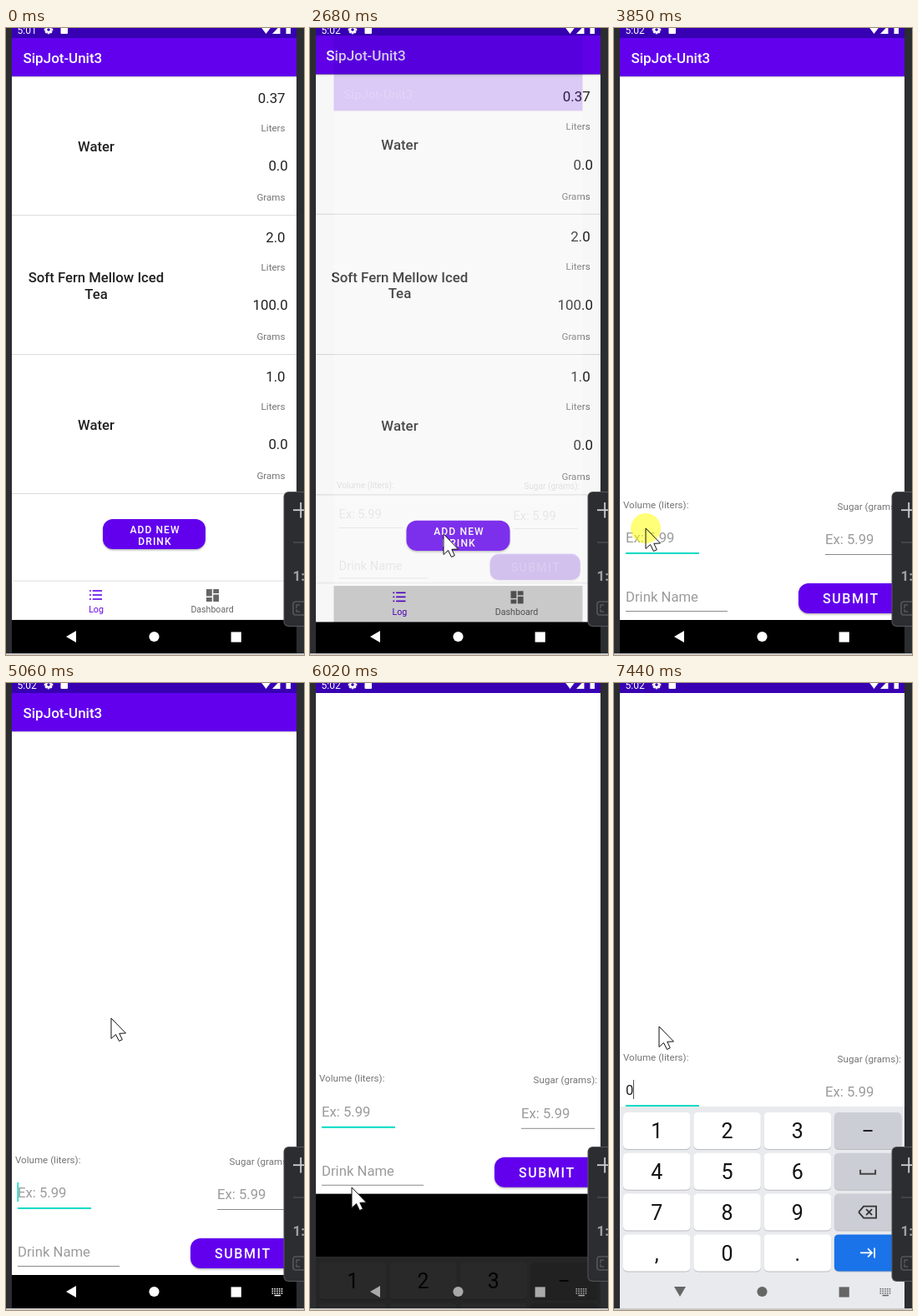
These frames come from a looping animation (357x752 px, 7990 ms). An HTML page with a canvas:

```html
<!DOCTYPE html>
<html lang="en">
<head>
<meta charset="utf-8">
<title>Drink log</title>
<style>
  html, body { margin: 0; width: 100%; height: 100%; overflow: hidden; background: #2b2d30; }
  canvas { display: block; width: 357px; height: 752px; }
</style>
</head>
<body>
<canvas id="stage" width="357" height="752"></canvas>
<script>
const ctx = document.getElementById('stage').getContext('2d');
const LOOP = 7990, STEP = 70;
const LEFT = 7, RIGHT = 348, WIDTH = RIGHT - LEFT;
const PURPLE = '#6200ee', DARK_PURPLE = '#3700b3', TEAL = '#03dac5';
const GREY = '#757575', HINT = '#9b9b9b', INK = '#212121';

const clamp = (v) => Math.min(1, Math.max(0, v));
const span = (t, from, to) => clamp((t - from) / (to - from));
const mix = (a, b, p) => a + (b - a) * p;
const smooth = (p) => p * p * (3 - 2 * p);

const BURSTS = [0, 510, 1680, 2680, 3380, 3850, 4050, 4520, 4850, 5390, 6860, 7310, 7440];
function snap(t) {
  const start = BURSTS.filter((b) => b <= t).pop();
  return start + Math.floor((t - start) / STEP) * STEP;
}

// [from, to, x0, y0, x1, y1]
const MOVES = [
  [440, 1070, 310, 760, 160, 607],
  [3310, 3520, 160, 607, 38, 600],
  [4780, 5060, 38, 600, 126, 402],
  [5320, 5670, 126, 402, 50, 605],
  [6230, 6850, 50, 605, 54, 412],
];
const CLICKS = [1680, 3850, 5670];
const CARET_ON = [[4050, 4590], [5060, 5560], [6810, 7310], [7440, LOOP]];

function rect(x, y, w, h, color) {
  ctx.fillStyle = color;
  ctx.fillRect(x, y, w, h);
}

function round(x, y, w, h, r, color) {
  ctx.fillStyle = color;
  ctx.beginPath();
  ctx.roundRect(x, y, w, h, r);
  ctx.fill();
}

function shadowed(dy, blur, color, draw) {
  ctx.save();
  ctx.shadowOffsetY = dy;
  ctx.shadowBlur = blur;
  ctx.shadowColor = color;
  draw();
  ctx.restore();
}

function poly(points, color) {
  ctx.fillStyle = color;
  ctx.beginPath();
  points.forEach(([x, y]) => ctx.lineTo(x, y));
  ctx.closePath();
  ctx.fill();
}

function lines(color, width, ...paths) {
  ctx.strokeStyle = color;
  ctx.lineWidth = width;
  ctx.beginPath();
  for (const path of paths) path.forEach(([x, y], i) => (i ? ctx.lineTo(x, y) : ctx.moveTo(x, y)));
  ctx.stroke();
}

function disc(x, y, r, color) {
  ctx.fillStyle = color;
  ctx.beginPath();
  ctx.arc(x, y, r, 0, Math.PI * 2);
  ctx.fill();
}

// y is the middle of the capital letters
function text(str, x, y, size, color, { align = 'left', weight = 400, gap = 0 } = {}) {
  ctx.font = `${weight} ${size}px Roboto, sans-serif`;
  ctx.letterSpacing = `${gap}px`;
  ctx.textAlign = align;
  ctx.fillStyle = color;
  ctx.fillText(str, x, y + size * 0.355);
}

function raisedButton(x, y, w, h, captions, size, gap) {
  shadowed(1.5, 2, 'rgba(0,0,0,.28)', () => round(x, y, w, h, 12, PURPLE));
  captions.forEach(([label, cx, cy]) =>
    text(label, cx, cy, size, '#fff', { align: 'center', weight: 500, gap }));
}

function appFrame() {
  rect(LEFT, -60, WIDTH, 72, DARK_PURPLE);
  rect(LEFT, 58, WIDTH, 652, '#fff');
  rect(LEFT, 12, WIDTH, 46, PURPLE);
  rect(LEFT, 58, WIDTH, 1, 'rgba(0,0,0,.16)');
  rect(LEFT, 59, WIDTH, 1, 'rgba(0,0,0,.06)');
  text('SipJot-Unit3', 20.5, 36, 17, '#fff', { weight: 500 });
  rect(LEFT, 710, WIDTH, 240, '#000');
}

function logRow(top, name, liters, grams) {
  name.forEach((line, i) => {
    const y = top + 84 + (i - (name.length - 1) / 2) * 19.5;
    text(line, 108, y, 16.7, INK, { align: 'center', weight: 500 });
  });
  const right = { align: 'right' };
  text(liters, 334.5, top + 26, 16.8, INK, right);
  text('Liters', 334.5, top + 61.5, 11.6, GREY, right);
  text(grams, 337.7, top + 107.5, 16.8, INK, right);
  text('Grams', 334.5, top + 145, 11.6, GREY, right);
  rect(LEFT, top + 166, WIDTH, 1, '#dcdcdc');
}

function logPage(t) {
  appFrame();
  logRow(58, ['Water'], '0.37', '0.0');
  logRow(225, ['Soft Fern Mellow Iced', 'Tea'], '2.0', '100.0');
  logRow(392, ['Water'], '1.0', '0.0');

  raisedButton(116, 589, 123, 36, [['ADD NEW', 178.5, 601.5], ['DRINK', 178.5, 616]], 12, 1.1);
  if (t >= 1810 && t < 2150) {
    round(116, 589, 123, 36, 12, `rgba(255,255,255,${0.22 * (1 - span(t, 1880, 2150))})`);
  }

  shadowed(0, 3, 'rgba(0,0,0,.25)', () => rect(8, 664, 340, 45.5, '#fff'));
  for (const y of [675, 680, 685]) {
    rect(100, y - 0.8, 1.8, 1.6, PURPLE);
    rect(103.7, y - 0.8, 11.3, 1.6, PURPLE);
  }
  text('Log', 108, 697.5, 10.6, PURPLE, { align: 'center' });
  rect(240, 673, 6.8, 8.5, '#666');
  rect(248.3, 673, 6.7, 5, '#666');
  rect(240, 683, 6.8, 5, '#666');
  rect(248.3, 679.5, 6.7, 8.5, '#666');
  text('Dashboard', 247, 697.5, 10.6, '#666', { align: 'center' });
}

function formPage(t) {
  appFrame();
  text('Volume (liters):', 11, 571.5, 11.6, GREY);
  text('Sugar (grams):', 344, 573.5, 11.6, GREY, { align: 'right' });

  const typed = t >= 7310;
  text(typed ? '0' : 'Ex: 5.99', 14, 611.5, 16.7, typed ? INK : HINT);
  text('Ex: 5.99', 253, 613.5, 16.7, HINT);
  text('Drink Name', 14, 682, 16.7, HINT);

  if (t >= 3850) rect(14, 629, 88, 2, TEAL);
  else rect(14, 630, 88, 1, '#8a8a8a');
  rect(253, 631, 88, 1, '#8a8a8a');
  rect(14, 699, 122, 1, '#8a8a8a');
  raisedButton(221, 666, 124, 36, [['SUBMIT', 283.8, 684.5]], 16, 1.6);

  if (CARET_ON.some(([from, to]) => t >= from && t < to)) {
    if (typed) rect(23, 599, 1, 23, '#555');
    else rect(13.5, 599, 1.5, 23, TEAL);
  }
}

function scaled(s, draw) {
  ctx.save();
  ctx.translate(177.5, 385);
  ctx.scale(s, s);
  ctx.translate(-177.5, -385);
  draw();
  ctx.restore();
}

function pageSwitch(t) {
  const e = 1 - Math.pow(1 - span(t, 2665, 3035), 4.2);
  scaled(mix(1, 1.05, e), () => logPage(t));
  rect(LEFT, 0, WIDTH, 750, `rgba(0,0,0,${0.2 * e})`);
  ctx.globalAlpha = span(t, 2665, 2745);
  scaled(mix(0.85, 1, e), () => formPage(t));
  ctx.globalAlpha = 1;
}

function keyIcon(row, x, y) {
  if (row === 0) rect(x - 5.5, y - 1, 11, 2, '#222');
  if (row === 1) lines('#444', 2, [[x - 9, y - 2], [x - 9, y + 3], [x + 9, y + 3], [x + 9, y - 2]]);
  if (row === 2) {
    lines('#333', 1.8,
      [[x - 11, y], [x - 5, y - 7], [x + 10, y - 7], [x + 10, y + 7], [x - 5, y + 7], [x - 11, y]],
      [[x - 2, y - 3.5], [x + 5, y + 3.5]], [[x + 5, y - 3.5], [x - 2, y + 3.5]]);
  }
  if (row === 3) {
    lines('#fff', 1.8, [[x - 9, y], [x + 5, y]], [[x, y - 5], [x + 5, y], [x, y + 5]],
      [[x + 8, y - 6], [x + 8, y + 6]]);
  }
}

function keyboard(p) {
  if (p <= 0) return;
  ctx.save();
  ctx.translate(0, (1 - p) * 242);
  rect(LEFT, 508, WIDTH, 242, '#e8eaed');
  const labels = ['123', '456', '789', ',0.'];
  for (let row = 0; row < 4; row++) {
    for (let col = 0; col < 4; col++) {
      const x = 11 + col * 84.3, y = 515 + row * 48.8;
      const color = col < 3 ? '#fff' : row === 3 ? '#1a73e8' : '#cbced5';
      round(x, y + 1, 80.5, 44, 5, '#b9bcc2');
      round(x, y, 80.5, 44, 5, color);
      if (col < 3) text(labels[row][col], x + 40.2, y + 22.3, 25, '#111', { align: 'center' });
      else keyIcon(row, x + 40.2, y + 22);
    }
  }
  rect(LEFT, 508, WIDTH, 242, `rgba(0,0,0,${1 - Math.pow(p, 1.35)})`);
  ctx.restore();
}

function systemNav(t, p) {
  const level = Math.round(mix(255, 102, clamp(p * 2.2)));
  const color = `rgb(${level},${level},${level})`;
  if (p < 0.5) poly([[84, 723], [84, 737], [72, 730]], color);
  else poly([[72, 724], [86, 724], [79, 736]], color);
  disc(177.5, 730, 6.1, color);
  rect(269.6, 724.4, 12.2, 12.2, color);
  if (t >= 4520) {
    for (let i = 0; i < 5; i++) {
      for (let j = 0; j < 3; j++) rect(318.5 + i * 2.8, 726 + j * 2.6, 1.6, 1.5, color);
    }
    rect(321.5, 733.8, 7.5, 1.5, color);
  }
}

function statusBar(t) {
  text(t < 790 ? '5:01' : '5:02', 13.5, 2.3, 12, '#fff');
  ctx.save();
  ctx.translate(51, 2);
  for (let i = 0; i < 4; i++) {
    rect(-1.3, -5.3, 2.6, 10.6, '#fff');
    ctx.rotate(Math.PI / 4);
  }
  ctx.restore();
  disc(51, 2, 3.8, '#fff');
  disc(51, 2, 1.8, DARK_PURPLE);
  round(65.5, -2, 8.5, 9, 1, '#fff');
  poly([[305.5, -1], [317.5, -1], [311.5, 7]], '#fff');
  poly([[319, 7], [328.5, 7], [328.5, -3]], '#fff');
  rect(335.5, -3, 5.5, 10, '#fff');
}

function sidePanel() {
  round(332.5, 556, 40, 162, 6, '#55575b');
  round(333.5, 557, 40, 160, 5, '#2b2d30');
  rect(344, 577.3, 13, 1.8, '#ced0d6');
  rect(352.3, 569, 1.8, 18.5, '#ced0d6');
  rect(344, 616.5, 13, 1, '#5a5d63');
  text('1:1', 343.5, 657, 17, '#9da0a8', { weight: 700 });
  ctx.strokeStyle = '#54575d';
  ctx.lineWidth = 1.6;
  ctx.beginPath();
  ctx.roundRect(344, 688, 20, 16, 3);
  ctx.stroke();
  lines('#54575d', 1.4, [[348, 696], [348, 692], [352, 692]], [[348, 697], [348, 700], [352, 700]]);
}

function pointerAt(t) {
  const move = MOVES.filter((m) => t > m[0]).pop();
  if (!move) return null;
  const [from, to, x0, y0, x1, y1] = move;
  const p = smooth(span(t, from, to));
  return [mix(x0, x1, p), mix(y0, y1, p)];
}

function pointer(t) {
  const at = pointerAt(t);
  if (!at) return;
  const arrow = [[0, 0], [0, 24.5], [5.5, 19.5], [9.5, 27.5], [13.3, 25.7], [9.8, 18.3], [17.5, 18], [0, 0]];
  ctx.save();
  ctx.translate(at[0], at[1]);
  poly(arrow, '#fff');
  const click = CLICKS.find((c) => t >= c && t < c + 340);
  if (click !== undefined) {
    const alpha = 0.53 * (1 - span(t, click + 130, click + 340));
    disc(0, 0, 18, `rgba(255,255,0,${alpha})`);
  }
  lines('#111', 1, arrow);
  ctx.restore();
}

function render(t) {
  const pan = 123 * (1 - Math.pow(1 - span(t, 5898, 6123), 2));
  const rise = smooth(span(t, 5928, 6206));

  rect(0, 0, 357, 752, '#2b2d30');
  rect(0, 750, 357, 2, '#c9c9c9');

  ctx.save();
  ctx.beginPath();
  ctx.rect(LEFT, 0, WIDTH, 750);
  ctx.clip();
  if (t < 2680) logPage(t);
  else if (t < 3030) pageSwitch(t);
  else {
    ctx.save();
    ctx.translate(0, -pan);
    formPage(t);
    ctx.restore();
    if (pan > 0) rect(LEFT, 0, WIDTH, 12, DARK_PURPLE);
  }
  keyboard(rise);
  systemNav(t, rise);
  statusBar(t);
  ctx.restore();

  sidePanel();
  pointer(t);
}

function tick() {
  render(snap(performance.now() % LOOP));
  requestAnimationFrame(tick);
}
tick();
</script>
</body>
</html>
```
